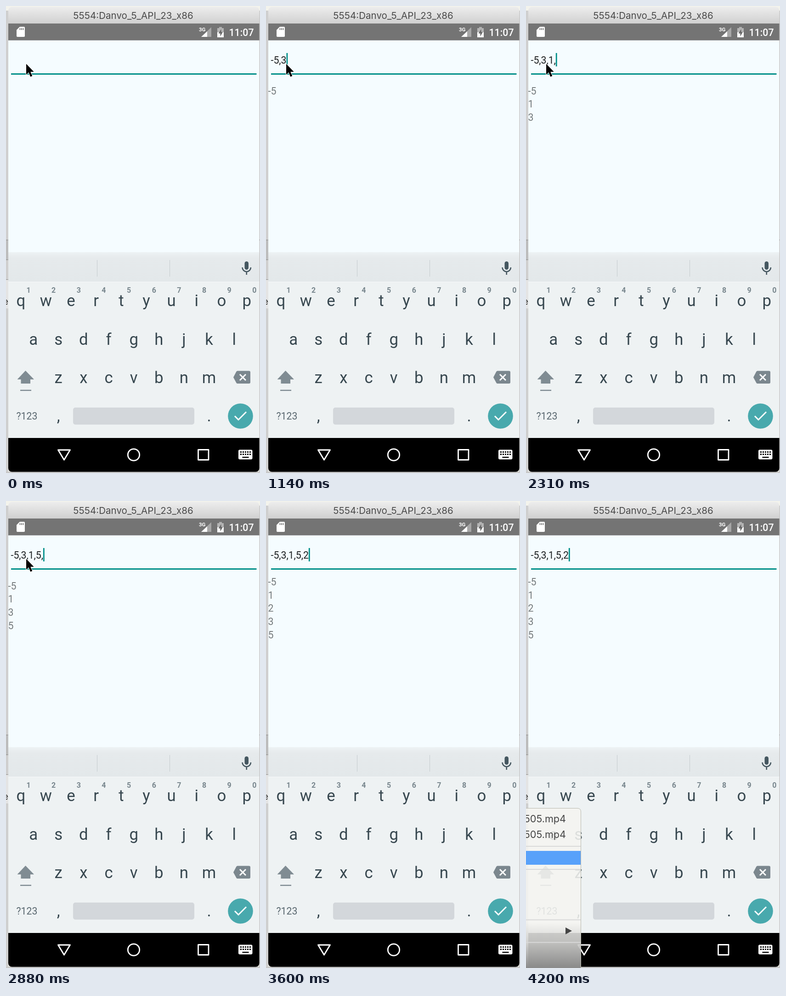
Recreate the animation shown at these times as an HTML page. Size 553 px wide and 1013 px high, loop 4.23 s.

```html
<!DOCTYPE html>
<html lang="en">
<head>
<meta charset="utf-8">
<title>Sorted input</title>
<style>
  html, body { margin: 0; width: 100%; height: 100%; overflow: hidden; background: #f3f3ec; }
  svg { display: block; width: 553px; height: 1013px; }
  text { font-family: Roboto, sans-serif; white-space: pre; }
  .mac { font-family: Inter, sans-serif; }
  .body { font-size: 21.27px; }
  .key { font-size: 34.8px; fill: #37474f; text-anchor: middle; }
  .hint { font-size: 16px; font-weight: 700; fill: #78868d; text-anchor: middle; }
  .nav { fill: none; stroke: #fff; stroke-width: 2.8; stroke-linejoin: round; }
</style>
</head>
<body>
<svg viewBox="0 0 553 1013">
  <defs>
    <linearGradient id="titleBar" x2="0" y2="1">
      <stop stop-color="#ededed"/><stop offset="1" stop-color="#d0d0d0"/>
    </linearGradient>
    <linearGradient id="strip" x2="0" y2="1">
      <stop stop-color="#edf2f4"/><stop offset=".2" stop-color="#e6eaec"/><stop offset="1" stop-color="#e3e8ea"/>
    </linearGradient>
    <linearGradient id="menuShade" x2="0" y2="1">
      <stop stop-color="#888" stop-opacity="0"/><stop offset=".45" stop-color="#888" stop-opacity=".3"/>
      <stop offset="1" stop-color="#858585" stop-opacity=".95"/>
    </linearGradient>
    <clipPath id="window"><rect x="5" y="2" width="546.5" height="1008.5" rx="8"/></clipPath>
  </defs>

  <!-- desktop behind the window -->
  <rect y="10" width="5" height="1000" fill="#cfcfcf"/>
  <rect x="551" y="10" width="2" height="1000" fill="#c9c9c9"/>
  <rect y="507" width="5" height="43" fill="#bdbdbd"/>
  <path d="M0 507.5H5M0 550.5H5M0 593.5H5M551 507.5h2" stroke="#8e8e8e"/>
  <rect y="594" width="5" height="62" fill="#e4e4e4"/>
  <text class="mac" x="-6" y="648" font-size="19" fill="#333">e</text>
  <rect y="1010" width="553" height="3" fill="#c8c8c8"/>

  <g clip-path="url(#window)">
    <rect y="2" width="553" height="36" fill="url(#titleBar)"/>
    <text class="mac" x="277" y="28.3" font-size="20.6" fill="#4b4b4b" text-anchor="middle">5554:Danvo_5_API_23_x86</text>

    <!-- status bar -->
    <rect y="38" width="553" height="37" fill="#747474"/>
    <path d="M30 45H39q2 0 2 2V65q0 2-2 2H25q-2 0-2-2V52Z" fill="#fff"/>
    <path d="M30.5 48v4M34 48v4M37.5 48v4" stroke="#747474" stroke-width="1.8"/>
    <path d="M447 46V67H425Z" fill="#a7a7a7"/>
    <path d="M438 55V67H425Z" fill="#fff"/>
    <text x="420" y="55" font-size="11.5" font-weight="700" fill="#fff">3G</text>
    <path d="M464 48V45.500h6V48h4V68H460V48Z" fill="#b4b4b4"/>
    <path d="M460 57H474V68H460Z" fill="#fff"/>
    <path d="M468.500 50L462.500 59.500H466.500V66L472 56.500H468.500Z" fill="#686868"/>
    <text class="body" x="485.500" y="64.500" font-weight="500" fill="#fff">11:07</text>

    <!-- application -->
    <rect y="74.500" width="553" height="460" fill="#f5fcff"/>
    <rect x="11" y="146" width="534.500" height="3" fill="#008f89"/>
    <text id="field" class="body" x="10.500" y="125.300" fill="#1d2021"></text>
    <rect id="caret" y="102" width="2.800" height="29" fill="#008f89"/>
    <g id="list" class="body" fill="#757a7c"></g>

    <!-- keyboard -->
    <rect y="534" width="553" height="64" fill="url(#strip)"/>
    <path d="M198.500 551V587M356.500 551V587" stroke="#c5cbce"/>
    <rect y="598" width="553" height="339" fill="#eef2f3"/>
    <path d="M5 598.500H552" stroke="#f6f9fa"/>
    <g fill="none" stroke="#455760" stroke-width="2.600">
      <rect x="519.500" y="554" width="8.500" height="18" rx="4.250" fill="#455760" stroke="none"/>
      <path d="M514.500 567a9.250 9.250 0 0 0 18.500 0M523.750 576.500V583"/>
    </g>
    <g id="keys"></g>
    <path d="M42.500 791L61 810H53V819H32.500V810H24.500ZM31 832.500H55V835H31Z" fill="#808c93"/>
    <path d="M504 791.500H529q3 0 3 3V816q0 3-3 3H504q-1.500 0-2.500-1.500L495 805.500L501.500 793q1-1.500 2.500-1.500Z" fill="#7b878e"/>
    <path d="M509 799L522 812M522 799L509 812" stroke="#fff" stroke-width="3"/>
    <text class="body" x="22.500" y="897" fill="#5a6870">?123</text>
    <rect x="146" y="871" width="264" height="37" rx="5" fill="#d3d7db"/>
    <circle cx="510.500" cy="889.500" r="27.300" fill="#48a9ad"/>
    <path d="M498 889.500L506 897.500L523 880.500" fill="none" stroke="#fff" stroke-width="3"/>

    <!-- navigation bar -->
    <rect y="937" width="553" height="76"/>
    <path class="nav" d="M113.500 963H139.500L126.500 984.500Z"/>
    <circle class="nav" cx="278" cy="973.500" r="12.700"/>
    <rect class="nav" x="418.500" y="962.500" width="22.500" height="22"/>
    <rect x="506" y="962.500" width="30.500" height="21" rx="3" fill="#fff"/>
    <path d="M510 967.500H533M510 972.500H533" stroke="#000" stroke-width="3" stroke-dasharray="3 2"/>
    <path d="M514.500 979H528.500" stroke="#000" stroke-width="2.600"/>
  </g>

  <path id="pointer" d="M0 0V23.500L5.300 18.500L9.300 28L13.300 26.200L9.300 17.200H16.700Z" stroke="#fff" stroke-width="1.800" paint-order="stroke"/>

  <g id="menu">
    <path d="M-10 666.500H112q7.500 0 7.500 7.500V1020H-10Z" fill="#f5f5f2" fill-opacity=".87" stroke="#b9b9ae"/>
    <rect y="915" width="119" height="98" fill="url(#menuShade)"/>
    <g class="mac" font-size="21.600" fill="#454545" text-anchor="end">
      <text class="mac" x="87" y="697">505.mp4</text>
      <text class="mac" x="87" y="730.500">505.mp4</text>
    </g>
    <rect y="759" width="119" height="30" fill="#58a1fa"/>
    <path d="M0 749H119M0 799H119M0 908.500H119M0 957.500H119" stroke="#d9d9d9" stroke-width="2"/>
    <path d="M86 925L100 932.500L86 940Z" fill="#454545"/>
  </g>
</svg>
<script>
  const LOOP = 4230, LIST_LAG = 120, BLINK = 500, KEY_STEP = 54.65;
  const TYPED = "-5,3,1,5,2";
  const KEY_TIMES = [270, 510, 810, 1080, 1380, 1680, 2040, 2400, 2760, 3150];
  const POINTER_LEAVES = 3360, POINTER_GONE = 3540, MENU_OPENS = 3960;
  const $ = id => document.getElementById(id);

  function addText(parent, x, y, text, className) {
    const node = document.createElementNS("http://www.w3.org/2000/svg", "text");
    node.setAttribute("x", x);
    node.setAttribute("y", y);
    if (className) node.setAttribute("class", className);
    node.textContent = text;
    parent.append(node);
    return node;
  }

  function addKeyRow(letters, x, y) {
    [...letters].forEach((letter, i) => addText($("keys"), x + i * KEY_STEP, y, letter, "key"));
  }

  addKeyRow("qwertyuiop", 32.3, 651);
  addKeyRow("asdfghjkl", 59.6, 734.5);
  addKeyRow("zxcvbnm", 114.2, 818);
  addKeyRow(",", 114.2, 901);
  addKeyRow(".", 442, 901);
  [..."1234567890"].forEach((digit, i) => addText($("keys"), 49 + i * KEY_STEP, 622, digit, "hint"));

  const rows = Array.from({ length: 5 }, () => addText($("list"), 4.5, 0, ""));
  const show = (id, visible) => $(id).setAttribute("visibility", visible ? "visible" : "hidden");
  const textAt = t => TYPED.slice(0, KEY_TIMES.filter(time => time <= t).length);
  const sortedNumbers = text => text.split(",").filter(s => s && !isNaN(s)).map(Number).sort((a, b) => a - b);

  function render(t) {
    const text = textAt(t);
    $("field").textContent = text;
    $("caret").setAttribute("x", 10.5 + (text ? $("field").getComputedTextLength() : 0));
    const lastKey = KEY_TIMES[text.length - 1];
    show("caret", text && Math.floor((t - lastKey) / BLINK) % 2 === 0);

    const numbers = sortedNumbers(textAt(t - LIST_LAG));
    const top = numbers.length === 5 ? 182.8 : 191.6;
    rows.forEach((row, i) => {
      row.textContent = numbers[i] ?? "";
      row.setAttribute("y", top + i * 28.8);
    });

    const p = Math.max(0, (t - POINTER_LEAVES) / (POINTER_GONE - POINTER_LEAVES));
    $("pointer").setAttribute("transform", `translate(${44 - 65 * p * p} ${125.5 + 90 * p * p})`);
    show("pointer", p < 1);
    show("menu", t >= MENU_OPENS);
  }

  const start = performance.now();
  function tick() {
    render((performance.now() - start) % LOOP);
    requestAnimationFrame(tick);
  }
  tick();
</script>
</body>
</html>
```
